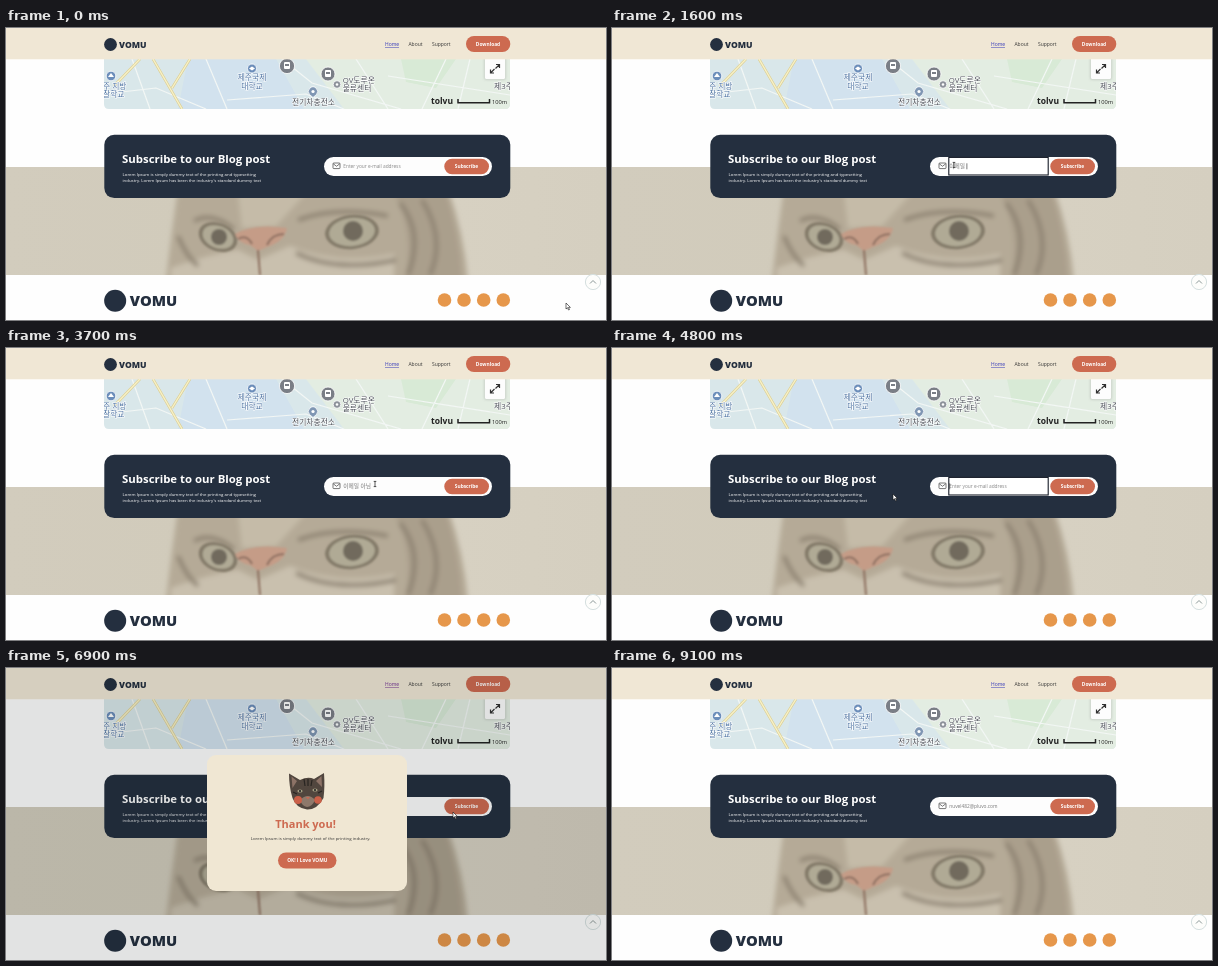
These frames come from a looping animation (600x292 px, 9150 ms). An HTML page:

```html
<!DOCTYPE html>
<html lang="en">
<head>
<meta charset="utf-8">
<title>Newsletter form</title>
<style>
  html, body { margin: 0; width: 100%; height: 100%; overflow: hidden; background: #fefefe; }
  svg { display: block; width: 100vw; height: 100vh; }
  text { font-family: "Open Sans", "Noto Sans CJK KR", "Noto Sans CJK", sans-serif; white-space: pre; }
  .bold { font-weight: 700; }
  .mid { text-anchor: middle; }
  .button { fill: #cd6a50; }
  .label { font-size: 4.85px; font-weight: 700; fill: #fff; text-anchor: middle; }
  .nav { font-size: 4.95px; fill: #333; }
  .map { font-size: 7.8px; fill: #4a4f57; stroke: #fff; stroke-width: 1.2; paint-order: stroke; }
  .blue { fill: #4f74a3; }
  .small { font-size: 4.35px; }
</style>
</head>
<body>
<svg viewBox="0 0 600 292" preserveAspectRatio="none">
  <defs>
    <g id="brand" fill="#242f3f">
      <circle cx="6.5" cy="6.5" r="6.4"/>
      <text x="15" y="9.7" font-size="8.6" font-weight="800">VOMU</text>
    </g>
    <clipPath id="mapClip"><path d="M98 31H504V76Q504 81 499 81H103Q98 81 98 76Z"/></clipPath>
    <clipPath id="photoClip"><rect y="139" width="600" height="108"/></clipPath>
    <clipPath id="modalClip"><rect x="201" y="87" width="200" height="136" rx="9"/></clipPath>
    <filter id="soft"><feGaussianBlur stdDeviation="2.5"/></filter>
    <filter id="slight"><feGaussianBlur stdDeviation="1"/></filter>
    <linearGradient id="wall">
      <stop stop-color="#d2ccbd"/><stop offset=".3" stop-color="#d1cbbb"/>
      <stop offset=".75" stop-color="#d7d1c2"/><stop offset="1" stop-color="#d5cfc0"/>
    </linearGradient>
  </defs>

  <rect width="600" height="292" fill="#fefefe"/>

  <!-- photo band -->
  <g clip-path="url(#photoClip)">
    <rect y="139" width="600" height="108" fill="url(#wall)"/>
    <g filter="url(#soft)">
      <path d="M172 160Q166 200 160 252H462Q458 205 442 160Z" fill="#b5aa97"/>
      <path d="M385 160Q410 205 398 252H456Q454 205 438 160Z" fill="#aa9f8c"/>
      <path d="M232 165L236 200 270 198 300 165Z" fill="#c5bba8"/>
      <path d="M165 240Q205 226 232 222L252 232 284 218Q330 238 388 226V255H165Z" fill="#c9c0ae"/>
      <path d="M188 193Q205 183 228 201M292 192Q330 178 382 188M394 175Q418 205 402 247M416 172Q440 210 424 247M172 208Q180 228 192 238M290 225Q330 245 390 232"
        fill="none" stroke="#8b806f" stroke-width="4"/>
    </g>
    <g filter="url(#slight)">
      <ellipse cx="212" cy="209" rx="20" ry="14" fill="#837a69" transform="rotate(22 212 209)"/>
      <ellipse cx="212" cy="209" rx="16" ry="11" fill="#b0aa95" transform="rotate(22 212 209)"/>
      <circle cx="213" cy="209" r="8" fill="#716a5d"/>
      <ellipse cx="346" cy="204" rx="27" ry="17" fill="#837a69" transform="rotate(-6 346 204)"/>
      <ellipse cx="346" cy="204" rx="23" ry="14" fill="#b0aa95" transform="rotate(-6 346 204)"/>
      <circle cx="347" cy="203" r="10" fill="#716a5d"/>
      <path d="M229 206Q248 195 281 200Q279 213 261 219L252 223 244 217Q232 215 229 206Z" fill="#c59c87"/>
      <path d="M232 211Q241 206 246 216M278 206Q266 206 261 217M252 222L254 247" fill="none" stroke="#8d6f60" stroke-width="2"/>
    </g>
  </g>

  <!-- map -->
  <g clip-path="url(#mapClip)">
    <rect x="98" y="31" width="406" height="50" fill="#d9e7ea"/>
    <path d="M182 31H270L298 81H172Z" fill="#d2e2ee"/>
    <path d="M300 31H504V81H338Z" fill="#e3ede2"/>
    <path d="M395 31H450L430 60 400 54Z" fill="#d8ead6"/>
    <path d="M98 66L150 60 200 81M126 31L144 81M200 31L221 81M221 72L300 66 338 81M276 31L306 55 395 81M350 31L382 81M382 48L504 67M440 31L416 81M464 31L452 81"
      fill="none" stroke="#f3f7f5" stroke-width="1.2"/>
    <path id="road" d="M147 31L176 81M184 31L166 60M108 58L134 31" fill="none" stroke="#dccf92" stroke-width="2.6"/>
    <path d="M147 31L176 81M184 31L166 60M108 58L134 31" fill="none" stroke="#f7f0c6" stroke-width="1.4"/>
    <g fill="#7a7e86" stroke="#fff" stroke-width=".8">
      <circle cx="281" cy="38" r="7.6"/><circle cx="322" cy="46" r="7"/>
      <circle cx="331" cy="56.5" r="3.8" fill="#8d929a"/>
      <g fill="#6c8eba"><circle cx="105" cy="48" r="4.8"/><circle cx="246" cy="40.5" r="4.5"/></g>
      <path d="M307 69.5L303.5 66.5A4.6 4.6 0 1 1 310.5 66.5Z" fill="#7f96b3"/>
    </g>
    <g fill="#fff">
      <rect x="278" y="34" width="6" height="7" rx="1"/><rect x="319" y="42" width="6" height="7" rx="1"/>
      <path d="M102 49L105 45 108 49ZM243 40.5L246 38.5 249 40.5 246 42.5Z"/>
      <circle cx="307" cy="63.5" r="1.6"/><circle cx="331" cy="56.5" r="1.3"/>
    </g>
    <path d="M279 36H283V38H279ZM320 44H324V46H320Z" fill="#7a7e86"/>
    <g class="map">
      <text class="blue" x="97" y="60.5">주 지방</text><text class="blue" x="97" y="69">찰학교</text>
      <text class="blue mid" x="246" y="52.4">제주국제</text><text class="blue mid" x="246" y="61">대학교</text>
      <text x="336.7" y="55">QV도루온</text><text x="336.7" y="63.3">물류센터</text>
      <text x="286" y="76.7">전기차충전소</text><text x="488" y="61">제3주</text>
    </g>
    <text x="425" y="76" font-size="8.5" class="bold" fill="#222">tolvu</text>
    <path d="M452 71V74.7H483.5V71" fill="none" stroke="#222" stroke-width="1.5"/>
    <text x="486" y="76" font-size="5.7" fill="#222">100m</text>
    <rect x="478" y="28" width="22" height="24" rx="2" fill="#8884" filter="url(#slight)"/>
    <rect x="479" y="28" width="20" height="23" rx="1.5" fill="#fdfdfd"/>
    <path d="M490 36.5H493.5V40M493.5 36.5L489.5 40.5M488 45H484.5V41.5M484.5 45L488.5 41" fill="none" stroke="#333" stroke-width="1.2"/>
  </g>

  <!-- header -->
  <rect width="600" height="31.3" fill="#f0e7d5"/>
  <use href="#brand" x="98" y="10"/>
  <text id="home" class="nav" x="379" y="18" text-decoration="underline">Home</text>
  <text class="nav" x="402.5" y="18">About</text>
  <text class="nav" x="426" y="18">Support</text>
  <rect class="button" x="460" y="8" width="44.3" height="16" rx="8"/>
  <text class="label" x="482" y="18">Download</text>

  <!-- subscribe card -->
  <rect x="98.3" y="106.7" width="406" height="63.4" rx="10" fill="#242f3f"/>
  <text x="116" y="134.5" font-size="11.4" class="bold" fill="#fff">Subscribe to our Blog post</text>
  <g class="small" fill="#fff">
    <text x="116.5" y="147.5">Lorem Ipsum is simply dummy text of the printing and typesetting</text>
    <text x="116.5" y="153.5">industry. Lorem Ipsum has been the industry's standard dummy text</text>
  </g>
  <rect x="318" y="129" width="168" height="19" rx="9.5" fill="#fdfdfd"/>
  <g fill="none" stroke="#4a4a4a" stroke-width=".75">
    <rect x="327" y="135" width="7" height="5.6" rx=".8"/><path d="M327.3 135.8L330.5 138.3 333.7 135.8"/>
  </g>
  <rect id="focusRing" x="336.8" y="129.4" width="99.4" height="17.6" fill="#fff" stroke="#141a26" stroke-width="1.1"/>
  <text id="field" x="337.3" y="140.2"></text>
  <path id="caret" d="M0 135.3V141.3" stroke="#222" stroke-width=".6"/>
  <rect class="button" x="438.3" y="130.7" width="44.7" height="15.6" rx="7.8"/>
  <text class="label" x="460.5" y="140.4">Subscribe</text>

  <!-- footer -->
  <use href="#brand" transform="translate(98 261.5) scale(1.72)"/>
  <g fill="#e6974b">
    <circle cx="438.5" cy="272" r="6.8"/><circle cx="458" cy="272" r="6.8"/>
    <circle cx="477.7" cy="272" r="6.8"/><circle cx="497.3" cy="272" r="6.8"/>
  </g>
  <circle cx="587" cy="254" r="7.6" fill="#fdfdfb" stroke="#d5dfdf"/>
  <path d="M584 255.5L587 252.5 590 255.5" fill="none" stroke="#8a9696" stroke-width="1"/>

  <!-- modal -->
  <g id="modal">
    <rect width="600" height="292" fill="#000c0c" opacity=".11"/>
    <rect x="201" y="87" width="200" height="136" rx="9" fill="#f0e7d3"/>
    <g clip-path="url(#modalClip)"><g id="confetti"></g></g>
    <path d="M283 105.5L294 112Q302 108 308 111L318 105Q319 119 317.5 130Q311 142 301 141.5Q290 140 286.5 130Q283 119 283 105.5Z" fill="#51463e"/>
    <path d="M285.5 108.5L291 113 286.5 120ZM315.5 108L310 113 316 119Z" fill="#8d7367"/>
    <path d="M298 111L299 118M302 111V118M306 112L305 118M287 124L291 126M316 123L312 125" stroke="#292522" stroke-width="1.2" fill="none"/>
    <path d="M294 132Q302 124 309 132Q306 139 301 139Q296 138 294 132Z" fill="#8e796b"/>
    <g fill="#cb6048"><circle cx="292" cy="132" r="4"/><circle cx="312" cy="132" r="3.8"/></g>
    <g fill="#aaa587"><ellipse cx="294" cy="123" rx="2.6" ry="1.5"/><ellipse cx="309" cy="122" rx="2.6" ry="1.5"/></g>
    <g fill="#222"><circle cx="294" cy="123" r="1.1"/><circle cx="309" cy="122" r="1.1"/></g>
    <path d="M299.5 129H304L302 131.5Z" fill="#c06b57"/>
    <text class="bold mid" x="299.5" y="160" font-size="11" fill="#cd6a50">Thank you!</text>
    <text class="small mid" x="304.5" y="171.5" fill="#333">Lorem Ipsum is simply dummy text of the printing industry.</text>
    <rect class="button" x="272" y="184.5" width="58.5" height="16" rx="8"/>
    <text class="label" x="301.3" y="194.3">OK! I Love VOMU</text>
  </g>

  <g id="pointer">
    <path id="arrow" d="M0 0V6L1.5 4.7 2.5 7 3.5 6.6 2.5 4.4H4.4Z" fill="#fff" stroke="#111" stroke-width=".6"/>
    <path id="beam" d="M-1.3 -2.6H1.3M0 -2.6V2.6M-1.3 2.6H1.3" fill="none" stroke="#111" stroke-width=".7"/>
    <path id="hand" d="M-.7 0H.5V2L2.5 2.5V4.5L1.7 6H-1L-2.2 3.8 -1.6 3.4 -.7 4.2Z" fill="#fff" stroke="#111" stroke-width=".5"/>
  </g>
</svg>
<script>
const LOOP = 9150, STEP = 50;
const EMAIL = "nuvel482@pluvo.com";
const WORDS = ["ㅇ", "이", "임", "이메", "이멩", "이메이", "이메일", "이메일 ",
  "이메일 ㅇ", "이메일 아", "이메일 안", "이메일 아니", "이메일 아님"];
const MODAL_OPEN = 6750, MODAL_CLOSE = 8200;

// time, x, y
const POINTER_PATH = [
  [0, 560, 275], [350, 560, 275], [900, 342, 137], [2000, 342, 137], [2300, 460, 141],
  [2450, 460, 141], [2800, 400, 3], [3050, 400, 3], [3600, 369, 136], [4300, 369, 136],
  [4650, 281, 146], [6200, 281, 146], [6600, 447, 144], [7100, 447, 144],
  [7700, 303.5, 195.5], [LOOP, 303.5, 195.5]
];

const COLORS = { red: "#cf5a42", purple: "#6d45cf", orange: "#eeb04a", blue: "#86bde3" };
const SHAPES = {
  squiggle: "M-5 -2Q-3 -5 -2 -1T1 0T4 2T6 3",
  arc: "M-3 2Q0 -4 3 1",
  bar: "M-2 0H2",
  dot: "M-1.2 -1.2H1.2V1.2H-1.2Z",
  ring: "M-3 0A3 3 0 1 1 3 0A3 3 0 1 1 -3 0Z"
};
const CONFETTI = [
  [205, 91, "purple", "arc"], [214, 98, "red", "ring"], [231, 99, "orange", "arc"],
  [263, 93, "purple", "squiggle"], [256, 101, "orange", "arc"], [276, 99, "blue", "squiggle"],
  [272, 107, "red", "ring"], [290, 91, "orange", "bar"], [331, 101, "orange", "dot"],
  [356, 99, "red", "squiggle"], [377, 94, "purple", "dot"], [394, 95, "orange", "arc"],
  [398, 101, "blue", "bar"], [238, 113, "red", "squiggle"], [226, 118, "blue", "bar"],
  [233, 130, "orange", "dot"], [255, 119, "red", "arc"], [266, 126, "blue", "squiggle"],
  [346, 113, "red", "ring"], [337, 129, "blue", "arc"], [361, 120, "orange", "arc"],
  [368, 126, "blue", "squiggle"], [385, 134, "purple", "ring"], [397, 120, "orange", "arc"],
  [208, 126, "red", "squiggle"], [216, 141, "orange", "arc"], [204, 152, "purple", "arc"],
  [212, 181, "orange", "dot"], [206, 209, "red", "squiggle"], [387, 173, "blue", "bar"],
  [397, 148, "orange", "arc"], [399, 178, "orange", "arc"], [399, 199, "purple", "squiggle"],
  [384, 209, "blue", "ring"]
];

const $ = id => document.getElementById(id);
const show = (id, on) => $(id).style.display = on ? "" : "none";

$("confetti").innerHTML = CONFETTI.map(([x, y, color, shape], i) =>
  `<path d="${SHAPES[shape]}" fill="none" stroke="${COLORS[color]}" stroke-width="2.2"
    transform="translate(${x} ${y}) rotate(${i * 67 % 360})"/>`).join("");

function pointerAt(t) {
  const i = POINTER_PATH.findIndex(key => key[0] > t);
  const [t0, x0, y0] = POINTER_PATH[i - 1], [t1, x1, y1] = POINTER_PATH[i];
  const p = (t - t0) / (t1 - t0), ease = p * p * (3 - 2 * p);
  return [x0 + (x1 - x0) * ease, y0 + (y1 - y0) * ease];
}

function valueAt(t) {
  if (t < 1050) return "";
  if (t < 4400) return WORDS[Math.min(WORDS.length - 1, Math.floor((t - 1050) / 75))];
  return EMAIL.slice(0, Math.max(0, Math.floor((t - 4750) / 85)));
}

function drawField(t) {
  const value = valueAt(t), field = $("field");
  const focused = t >= 950 && t < 2350 || t >= 4000 && t < 6700;
  field.textContent = value || "Enter your e-mail address";
  field.setAttribute("font-size", value && t < 4400 ? 5.7 : 4.8);
  field.setAttribute("fill", value ? "#777" : "#858585");
  show("focusRing", focused);
  show("caret", focused);
  const end = value ? field.getComputedTextLength() : 0;
  $("caret").setAttribute("transform", `translate(${337.7 + end} 0)`);
}

function drawPointer(t, modal) {
  const [x, y] = pointerAt(t);
  const inside = (left, top, right, bottom) => x > left && x < right && y > top && y < bottom;
  const beam = !modal && inside(337, 129, 437, 148);
  const hand = modal ? inside(272, 184, 331, 201) : inside(438, 130, 483, 147);
  show("beam", beam);
  show("hand", hand);
  show("arrow", !beam && !hand);
  show("pointer", t < MODAL_CLOSE + 100);
  $("pointer").setAttribute("transform", `translate(${x} ${y})`);
}

function draw(t) {
  const modal = t >= MODAL_OPEN && t < MODAL_CLOSE;
  drawField(t);
  drawPointer(t, modal);
  show("modal", modal);
  $("home").style.fill = modal ? "#6f2c91" : "#2f35b8";
  $("confetti").setAttribute("transform", `translate(0 ${(t - 8000) * 0.125})`);
}

function tick() {
  draw(Math.floor(performance.now() % LOOP / STEP) * STEP);
  requestAnimationFrame(tick);
}
tick();
</script>
</body>
</html>
```
